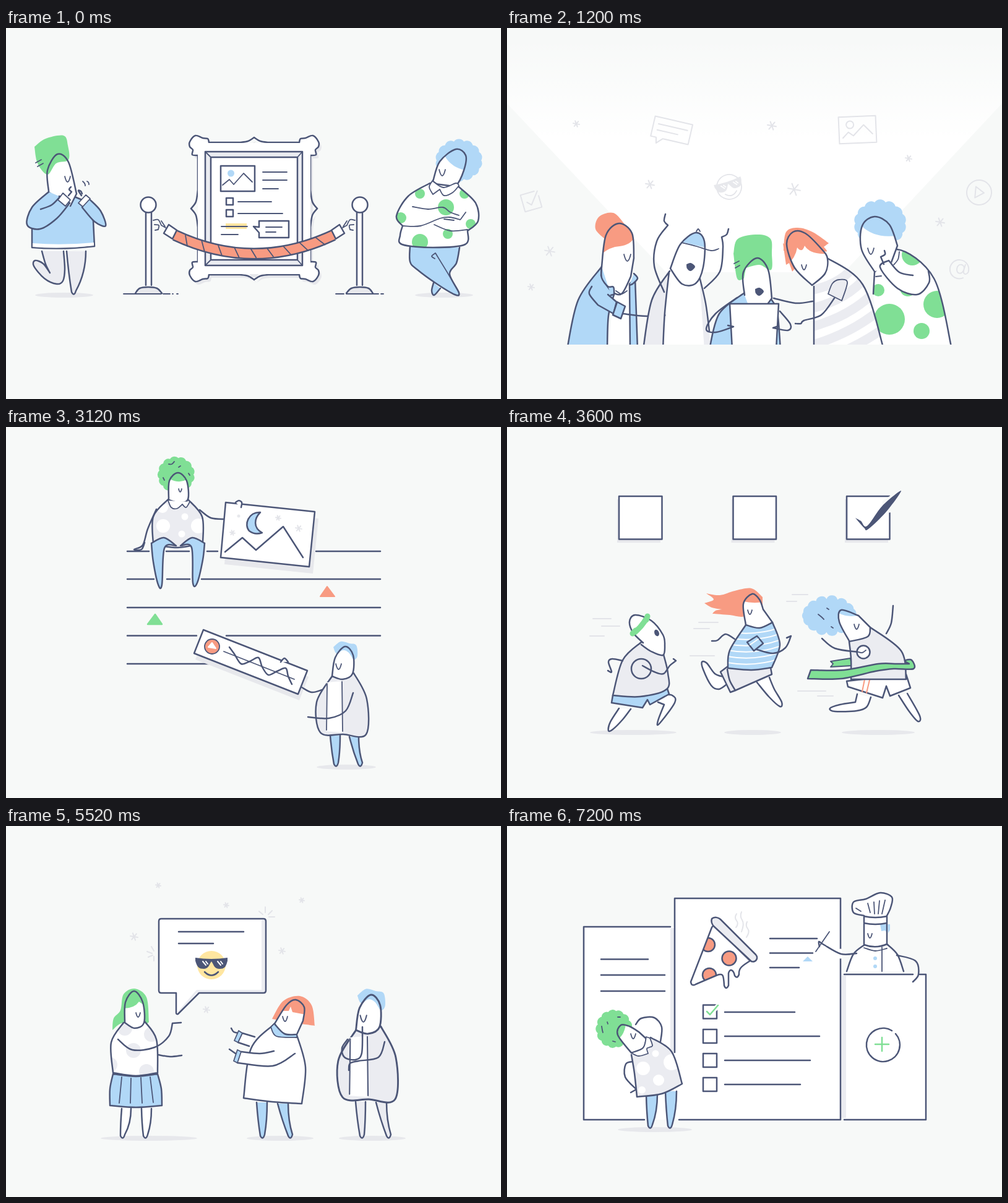
Write an HTML page that moves like this. It is 800 px wide and 600 px high and loops after 8.4 s.

```html
<!DOCTYPE html>
<html lang="en">
<head>
<meta charset="utf-8">
<title>Teamwork</title>
<style>
html,body{margin:0;height:100%;overflow:hidden;background:#f7f9f8}
svg{display:block;width:800px;height:600px;fill:none;stroke:#4c5677;stroke-width:2.5;stroke-linecap:round;stroke-linejoin:round}
.w{fill:#fff}.b{fill:#b1d8f7}.g{fill:#80df95}.r{fill:#f89b82}.e{fill:#ebecf1}.s{fill:#e7e8ec}.y{fill:#ffe6a0}.k{fill:#4c5677}
.n{stroke:none}.t{stroke-width:1.8}.i{stroke:#e3e4e9;stroke-width:2}.iw{stroke:#fff;stroke-width:2}
.gs{stroke:#80df95}.rs{stroke:#f89b82;stroke-width:2}
</style>
</head>
<body>
<svg viewBox="0 0 800 600"></svg>
<script>
let clips = 0;
// Smooth curve through points: "/" makes a corner, "|" starts a new part, "z" closes.
const curve = d => d.split('|').map(part => {
  let last, out = '';
  for (const run of part.split('/')) {
    const v = run.match(/[\d.-]+/g).map(Number), q = last ? [last] : [];
    for (let i = 0; i < v.length; i += 2) q.push([v[i], v[i + 1]]);
    if (!last) out = 'M' + q[0];
    for (let i = 0; i + 1 < q.length; i++) {
      const a = q[i], b = q[i + 1], from = q[i - 1] || a, to = q[i + 2] || b;
      out += 'C' + [0, 1].map(k => a[k] + (b[k] - from[k]) / 6) + ' ' + [0, 1].map(k => b[k] - (to[k] - a[k]) / 6) + ' ' + b;
    }
    last = q.at(-1);
  }
  return out + (part.endsWith('z') ? 'Z' : '');
}).join('');
const data = d => d[0] === 'M' ? d : curve(d);
const p = (d, c = '', more = '') => `<path class="${c}" d="${data(d)}" ${more}/>`;
const o = (x, y, r, c, ry = r) => `<ellipse class="${c}" cx="${x}" cy="${y}" rx="${r}" ry="${ry}"/>`;
const group = (body, transform) => `<g transform="${transform}">${body}</g>`;
const clip = (d, body) => `<clipPath id="c${++clips}">${p(d)}</clipPath><g clip-path="url(#c${clips})">${body}</g>`;
const layered = (d, fill, body) => p(d, fill + ' n') + body + p(d);
const inked = (d, fill, body) => layered(d, fill, clip(d, body));
const shadow = (x, y, r) => o(x, y, r, 's n', 4);
const dots = (c, ...list) => list.map(([x, y, r]) => o(x, y, r, c + ' n')).join('');
const rows = (c, ...list) => p(list.map(([x, y, end]) => `M${x} ${y}H${end}`).join(''), c);
const box = (x, y, w, c = 'w', h = w) => p(`M${x} ${y}h${w}v${h}h${-w}Z`, c);
const eye = (x, y, w = 9) => p(`M${x} ${y}q${w / 2} ${w * 2} ${w} 0`, 't');
const leg = (x1, x2, foot, top, bottom, c) => {
  const mid = (top + bottom) / 2;
  return p(`M${x1} ${top}Q${(x1 + foot) / 2 - 3} ${mid} ${foot - 4} ${bottom - 4}Q${foot} ${bottom + 4} ${foot + 3} ${bottom - 6}Q${x2} ${mid} ${x2} ${top}`, c);
};
const cloud = (x, y, rx, ry, n, c) => {
  const size = (rx + ry) / n * 2;
  const at = k => `${x + rx * Math.cos(k / n * 6.283)} ${y + ry * Math.sin(k / n * 6.283)}`;
  let d = 'M' + at(0);
  for (let k = 1; k <= n; k++) d += `A${size} ${size} 0 0 1 ${at(k)}`;
  return p(d, c + ' n');
};
const stars = (...list) => p(list.map(([x, y, r]) => [10, 70, 130].map(a => {
  const dx = r * Math.cos(a / 57.3), dy = r * Math.sin(a / 57.3);
  return `M${x - dx} ${y - dy}L${x + dx} ${y + dy}`;
}).join('')).join(''), 'i');
const icons = {
  bubble: 'M-31-17H31V16H-11L-20 25-22 16H-31ZM-23-6H25M-23 4H11',
  picture: 'M-30-22H30V21H-30ZM-24 12L-15 3-7 9 10-8 24 7M-6-9A6 6 0 1 1-18-9A6 6 0 1 1-6-9',
  check: 'M9-14H-14V14H14V-5M-7 0L-1 6 14-13',
  play: 'M20 0A20 20 0 1 1-20 0A20 20 0 1 1 20 0M-6-9L8 0-6 9Z',
  at: 'M7 15A16 16 0 1 1 14 4C10 11 5 8 6 1L7-8M6 0C5 11-7 11-6 0C-5-9 6-9 6 0'
};
const icon = (name, x, y, angle, scale = 1) => group(p(icons[name], 'i'), `translate(${x} ${y})rotate(${angle})scale(${scale})`);
const cool = (face, shades, smile) => o(0, 0, 23, face) + p('M-26-12Q0-8 26-12V-7C23 5 20 6 12 6C4 6 3-3 0-6C-3-3-4 6-12 6C-21 6-23 3-26-7Z', shades) +
  p('M-14-6L-9 0M-9-6L-6-2M10-6L15 0M15-6L18-2', 'iw') + p('M-11 11Q0 22 11 11', smile);

function gallery() {
  const corner = '401 177 391 183 378 185/328 185/326 179 318 178 306 174 297 184 297 192 302 197 301 205 310 206/310 262/307 281 299 292';
  const mirror = 'translate(802)scale(-1 1)';
  const frame = c => ['', mirror, 'translate(0 584)scale(1 -1)', 'translate(802 584)scale(-1)'].map(f => group(p(corner, c), f)).join('') + box(310, 186, 182, c + ' n', 212);
  const post = box(226, 300, 9, 'w n', 116) + p('M226 298V416M235 298V416') + p('209 429 216 421 230 419 244 421 252 429', 's') + o(230, 286, 12.5, 'w') +
    p('238 311 246 310 251 319/258 323|240 318 247 319 246 326/241 327|251 312 257 321', 't') + p('M263 318L276 327 269 341 255 332Z', 'w');
  const rope = (c, w) => p('M273 335Q401 395 529 335', '', `style="stroke:${c};stroke-width:${w};stroke-linecap:butt"`);
  let bands = '';
  for (let k = 0; k < 9; k++) {
    const x = 290 + 26.4 * k;
    bands += `M${x} ${357 - 22 * ((x - 401) / 112) ** 2}l${3 + 1.4 * k} ${17.5 - .8 * k}`;
  }
  return group(frame('s n'), 'translate(4 5)') + frame('w') + box(322, 200, 157, 'e', 184) + box(331, 209, 140, 'w', 166) + p('M322 200L331 209M479 200L471 209M322 384L331 375M479 384L471 375', 't') +
    box(347, 223, 55, 'w', 41) + o(363.5, 235, 5.5, 'b n') + p('M350 254L361 245 368 253 384 235 398 249', 't') + box(356, 275, 11) + box(356, 294, 11) + box(355, 316, 34, 'y n', 9) +
    p('M409 312H457V339H409V331L400 321 409 322Z') + rows('t', [415, 233, 454], [415, 246, 454], [415, 260, 440], [375, 281, 429], [375, 300, 447], [348, 321, 390], [348, 334, 375], [420, 322, 446], [420, 330, 436]) +
    rope('#4c5677', 19) + rope('#f89b82', 14) + p(bands, 't') + post + group(post, mirror) +
    rows('t', [190, 430, 251], [254, 430, 265], [269, 430, 270], [276, 430, 278], [533, 430, 546], [550, 430, 602], [606, 430, 610]) +
    shadow(94, 432, 47) + p('58 361 64 382 71 396/60 381 47 376 45 385 62 405 82 414 92 409 95 390 93 361', 'e') + leg(98, 129, 110, 361, 431, 'e') +
    p('M69 265L42 322V355Q90 359 143 353L141 312 123 278 104 270Z', 'b') + p('M43 348Q90 352 142 347V352Q90 358 43 354Z', 'w n') +
    layered('69 264 67 230 83 204 101 217 114 268/104 288', 'w', p('46 192 64 179 93 174 100 190 101 213 81 219 67 237 51 219 46 192', 'g n')) + eye(95, 240) + p('M48 218L57 213M51 224L60 219M124 248Q128 251 128 255M131 248Q134 249 134 253', 't') +
    p('69 265 42 290 34 318 55 325 82 308 103 283/86 272|135 277 153 296 161 320 143 313 123 290', 'b') + p('56 293 74 286 88 272|101 271 106 265/102 261 105 257|122 271 117 263 121 264 123 268') + p('M92 267L104 278 96 288 84 278ZM129 270L136 276 124 289 117 283Z', 'w t') +
    shadow(708, 432, 47) + p('691 412 688 425 692 432 702 421|653 352 653 378 665 391 695 413 725 431 732 428 717 398 728 380 733 355', 'b') + p('732 428 716 400 694 364/688 369 693 373', 't') +
    cloud(732, 214, 36, 31, 14, 'b') + inked('690 248 701 216 727 196 743 206 740 230 727 255 707 258 690 248', 'w', p('M690 190H750V231Q722 229 709 207Z', 'b n')) + eye(700, 229, 10) +
    inked('685 251 650 272 631 304 641 320/637 335 640 350 690 355 742 350 746 328/763 312 759 283 732 257z', 'w', dots('g', [669, 268, 8], [741, 268, 8], [711, 290, 13], [638, 307, 9], [751, 317, 8], [714, 333, 8], [669, 346, 13])) +
    p('641 320 670 320 701 308 717 306 734 310|692 318 718 328 746 326|657 289 682 293 706 290 718 298 732 303|743 298 735 309|708 309 724 311', 't') + p('690 246 684 257 690 269/701 261/708 271 722 266 732 255/727 251 707 258 690 248', 'w t');
}

function crowd() {
  let stripes = '';
  for (let k = 0; k < 6; k++) stripes += `M485 ${425 + k * 30}Q${550 + k * 5} ${415 + k * 26} ${575 + k * 14} ${365 + k * 26}`;
  const mouth = p('290 382 297 380 304 386 297 393 291 389 290 382', 'k n');
  const people =
    p('592 430/594 395/630 358 690 405 719 520/600 520', 'w n') + clip('592 430/594 395/630 358 690 405 719 520/600 520', dots('g', [655, 367, 17], [600, 424, 10], [648, 421, 13], [618, 471, 25], [695, 447, 22], [670, 490, 13])) + p('592 430/594 395/630 358 690 405 719 520') +
    cloud(603, 316, 40, 35, 14, 'b') + inked('594 394 573 358 574 320 594 305 618 318 631 352/620 382', 'w', p('M565 300H635V335Q595 342 573 320Z', 'b n')) + eye(583, 356, 10) + p('634 362 632 374 625 383|596 402 605 401', 't') +
    p('603 387/617 376 634 395 656 400/670 399/681 393 682 412 663 431 631 421 603 387', 'w n') + p('656 400 634 395 617 376/603 387 631 421 663 431 682 412 681 393|609 382 604 370/611 366 610 360') +
    inked('514 370 575 415 609 520/496 520/496 418', 'w', p(stripes, '', 'style="stroke:#ebecf1;stroke-width:15"')) +
    p('447 360 451 330 470 323 494 330 520 348/512 354/517 361 508 361/515 367/490 374z', 'r n') + p('M446 348L451 383 456 380 461 394 468 386 474 372Z', 'r n') +
    inked('493 416 465 388 452 350 462 330 482 332 508 357 518 373 514 397 493 416', 'w', p('M445 320H520V365Q490 367 481 352 477 365 469 355 466 376 445 388Z', 'r n')) + eye(476, 383, 8) +
    p('529 437 508 464 480 473 475 478 466 478|494 442 466 445 431 437') + p('519 430/526 413 537 407 550 411 541 441z', 'e t') +
    p('M174 428L162 520H199V400Z', 'w n') + p('159 342 143 325 149 305 172 299 190 317/180 345z', 'r n') + p('153 386 115 440 97 520/162 520/164 465 174 428/163 418 152 400z|198 414/199 520/211 520/207 405z', 'b') +
    inked('153 386 160 335 181 316 202 332 205 372/200 402/185 430 168 425 154 405', 'w', p('M150 368Q165 354 182 353 203 350 206 336V310H150Z', 'r n')) + eye(189, 366, 11) + p('153 386 153 404 163 418 172 419 173 431/168 432|205 397 211 405 203 414/198 416', 'b') + p('176 425 185 430 194 425', 't') +
    p('137 418 133 430 147 448/172 462/177 443/163 431', 'b') + p('187 462 225 466 265 464|265 459 272 457 279 460') + p('M178 443L191 450 184 470 171 464Z', 'b') +
    p('M262 394L252 520H319L311 402Z', 'w n') + p('M311 402L319 520H331Z', 'e n') + p('263 393 234 440 220 520/252 520/255 460 262 394', 'e') + p('311 402 321 445 327 490') +
    inked('264 389 280 350 305 331 319 345 317 387 305 413 283 414 264 389', 'w', p('M270 343L345 361V325H270Z', 'b n')) + p('282 347 306 353 330 360 342 357|306 329 309 325 312 329', 't') + mouth +
    p('254 427 238 385 242 345 260 319/254 312 256 301|319 421 344 394 349 355 347 338/355 334 358 325') +
    p('384 428 343 462 327 520/442 520/437 460 428 440', 'b') +
    layered('384 432 382 395 404 372 422 391 428 437/420 448/390 448', 'w', p('366 365 373 341 405 334 426 341 428 365 427 391 408 383 386 388/383 405/372 405 366 365', 'g n')) + p('M367 381L375 377M369 388L376 384', 't') + group(mouth, 'translate(111 40)') +
    p('M364 520L360 446H439L435 520', 'w') + p('372 436 337 462 322 487 338 492 366 483/357 481|441 458 458 479 454 489 430 485/439 482');
  return `<linearGradient id="beam" x2="0" y2="1"><stop offset=".04" stop-color="#fff" stop-opacity="0"/><stop offset=".45" stop-color="#fff"/></linearGradient>` + p('M0 0H800V122L545 395H257L0 122Z', 'n', 'style="fill:url(#beam)"') +
    icon('bubble', 266, 166, 13) + icon('picture', 566.5, 165, -2.5) + icon('check', 39, 280, -16) + icon('play', 763, 266, 5) + icon('at', 733, 389, 10, .95) +
    stars([112, 155, 5], [231, 253, 7], [428, 158, 7], [464, 261, 10], [649, 211, 5], [700, 314, 7], [69, 361, 8], [39, 419, 5]) +
    group(cool('i', 's n', 'i'), 'translate(359 257)rotate(-18)scale(.87)') + clip('M0 0H800V512H0Z', people);
}

function suit(neck) {
  return p('-23 48 -48 90 -42 139 -5 142 32 142 33 85 12 43', 'e') + p('M-32 58L-33 137-6 139-7 56Z', 'w n') + p('M-31 60L-32 135M-7 57L-6 137', 't') +
    layered('-23 48 -18 18 -2 0 11 14 10 44' + neck, 'w', p('-21 1 -9 -8 5 -5 16 -2 18 15 12 21 4 10 -5 6 -16 11 -21 1', 'b n')) + eye(-17, 28);
}

function timeline() {
  const photo = 'M355 122L499 137 490 226 347 211Z', strip = 'M319 328L487 394 472 432 304 366Z';
  return rows('', [196, 201, 231], [259, 201, 296], [325, 201, 342], [501, 201, 605], [196, 246, 239], [260, 246, 297], [316, 246, 605], [196, 292, 605], [196, 337.5, 308], [356, 337.5, 605], [196, 383, 333]) +
    p('M241 303L252 319H229Z', 'g gs') + p('M519 258L531 274H508Z', 'r rs') + cloud(275, 77, 28, 27, 13, 'g') +
    inked('262 117 238 145 238 190/278 195 318 188/317 145 294 117', 'e', dots('w', [254, 160, 11], [253, 130, 9], [289, 145, 5.5], [311, 160, 12], [284, 173, 5.5])) +
    inked('263 118 264 87 278 74 292 87 294 117 279 122 263 118', 'w', p('M255 90L264 84Q280 92 292 85L300 90V70H255Z', 'g n')) + p('262 119 267 130 276 132 285 125/291 130 297 121', 'w t') +
    eye(279, 100, 5) + p('263 60 268 60 272 56|279 65 282 63|254 82 256 86|295 75 297 78', 't') + p('243 133 229 165 221 191 207 198 219 198 224 187|313 134 331 147 354 149') +
    p('235 188 255 179 275 192/256 196 252 255 246 255 238 218 235 188|321 188 301 179 282 192/300 195 302 252 309 252 318 215 321 188', 'b') +
    group(p(photo, 's n'), 'translate(6 11)') + p(photo, 'w') + p('M354 202L382 179 404 199 448 161 480 211') + p('M411 138C392 137 384 158 393 168Q402 175 414 171C399 163 401 148 411 138Z', 'b') + stars([366, 171, 4], [440, 147, 4], [473, 164, 5]) + o(376, 144, 2.5, 's n') + p('371 122 376 119 381 122 380 130', 'w') +
    group(p(strip, 's n'), 'translate(2 10)') + p(strip, 'w') + o(333, 355, 12, 'r t') + p('M327 356L333 349 339 358Z', 'w iw') + p('M352 363L466 408', 't') +
    p('361 356 369 367 380 383 394 379 408 373 414 388 424 401 438 395 452 390 456 403 462 416') + p('444 380 450 374 456 380', 'w') +
    shadow(550, 550, 48) + leg(524, 540, 534, 499, 549, 'b') + leg(555, 570, 573, 501, 549, 'b') + p('478 421 494 429 511 425') + group(suit(' -6 53 -23 48'), 'translate(550 355)') + p('561 430 549 459 522 471 488 469');
}

function race() {
  let bands = '';
  for (let y = 330; y < 385; y += 10) bands += `M350 ${y}q50 10 95-7`;
  return [181, 365.5, 549].map(x => box(x - 3, 117, 70, 's n') + box(x, 112, 69.5)).join('') + p('M611 122L634 107M618 118V134', '', 'style="stroke:#f7f9f8;stroke-width:9"') + p('563 147 572 152 582 160 607 127 637 103 613 137 584 165 577 163 563 147', 'k n') +
    rows('i', [139, 310, 168], [153, 322, 182], [134, 338, 157], [310, 316, 341], [302, 326, 327], [296, 370, 335], [461, 271, 486], [452, 282, 468], [470, 427, 515], [502, 435, 527]) + shadow(204, 494, 70) + shadow(397, 494, 46) + shadow(600, 494, 59) +
    p('181 455 167 477 164 491 171 489 187 473 200 456|249 433 267 434 271 446 246 480 244 475 254 449/244 445', 'w') + p('M171 434L169 446 219 454 227 441 231 449 262 432 259 423Z', 'b') +
    p('217 348 187 377 171 434/215 436 258 424 260 398 253 368', 'e') + inked('220 349/204 333 198 315 207 304 233 313 252 336 255 353 252 369 233 363 217 352', 'w', p('M200 337Q218 325 229 303', '', 'style="stroke:#80df95;stroke-width:9"')) + p('M203 334L208 329M225 312L227 306', 'gs', 'style="stroke-width:9"') +
    group(o(0, 0, 3.7, 'k n', 5.5), 'translate(242 333)rotate(-20)') + p('187 378 170 375 164 380 169 396 163 394') + o(217, 391, 16, 'e') + p('219 386 238 396 253 399 263 386 273 378/269 375') +
    p('350 404 336 399 323 382 315 380 317 392 330 418 342 424 354 417|404 413 424 437 441 452 444 445 432 424 424 405', 'w') + p('M357 387L345 396 361 429 369 426 428 400 426 389Z', 'e') + p('356 392 360 410 369 426') + p('368 343 353 335 340 345 331 346') +
    p('322 269 344 272 368 265 395 261 413 275/413 288/385 306 360 304 332 302/337 297 347 295/331 292 319 285/334 279 322 269', 'r n') +
    inked('386 320 360 361 357 390/395 393 428 389/441 352 429 316', 'b', p(bands, 'iw')) + inked('386 320 382 286 396 270 408 279 414 295/429 316/408 325 386 320', 'w', p('M378 260H415V283Q395 286 378 281Z', 'r n')) + eye(389, 296, 7) +
    p('404 360 430 366 450 357 459 338/452 341') + p('M388 348L404 338 414 350 399 362Z', 'b') + p('M393 352L406 343', 'iw') +
    p('566 432 563 445/538 449 522 455 530 460 565 459 581 453 588 437|633 434 650 460 664 476 667 467 647 431', 'w') + p('M549 411L551 420 607 438 613 419 619 435 652 422 645 400Z', 'w') + p('M578 408L574 428M586 409L581 430', 'rs') +
    p('M523 379L555 374 557 386 523 388 527 383Z', 'g t') + cloud(521, 305, 43, 27, 15, 'b') + p('553 347 556 375 556 408/645 408/637 362 587 324', 'e') +
    inked('553 346 537 315 540 296 568 305/587 324/583 339 553 347', 'w', p('M525 285H575L570 304Q552 309 536 301Z', 'b n')) + eye(561, 319, 8) + p('503 303 508 307 512 311|517 293 520 295|524 323 527 325', 't') +
    p('509 342 530 358 567 364|613 334 621 317 624 289') + o(576, 364, 10.5, 'w') + p('565 363 574 365 580 361', 't') +
    p('491 393 545 393 600 383 630 383 650 383/643 378 654 377 657 391 625 391 595 395 540 407 486 407z', 'g');
}

function talk() {
  const bubble = 'M247 154Q247 150 251 150H416Q420 150 420 154V266Q420 270 416 270H312L278 304Q275 305 275 302V270H251Q247 270 247 266Z';
  return stars([246, 96, 4], [356, 128, 4], [478, 120, 4], [446, 202, 5], [207, 179, 6], [324, 297, 5]) + p('M409 138L415 143M419 131V140M430 137L424 143M425 147H434M228 203L236 206M235 195L239 202M230 212L237 209M239 211V218', 'i') +
    inked(bubble, 'w', p('M413 152H420V270H308L278 304V300L308 265H413Z', 'e n')) + rows('', [279, 171, 384], [279, 190, 335]) + group(cool('y n', 'k n', ''), 'translate(332 225)') +
    shadow(231, 505, 78) + shadow(443, 505, 54) + shadow(592, 505, 54) + leg(187, 202, 189, 457, 505, 'w') + leg(219, 235, 226, 457, 505, 'w') +
    p('172 330 174 311 185 298 190 272 208 263 227 277 231 317/222 325/190 318 172 330', 'g n') + inked('190 318 170 350 173 399/210 404 245 399/243 345 224 316', 'w', dots('e', [192, 327, 12], [206, 363, 12], [235, 337, 12], [168, 386, 12], [227, 397, 12])) +
    inked('192 318 193 285 207 267 221 285 223 318 208 327 192 318', 'w', p('M185 295Q207 296 215 284L230 295V260H185Z', 'g n')) + eye(210, 302, 7) +
    p('173 401 168 425 168 452/210 455 252 452/251 425 245 401/210 405 173 401', 'b') + p('M187 406L183 448M202 408L201 448M218 407L220 448M233 406L238 447', 't') + p('181 345 204 362 240 358 263 340 269 319/283 318|246 370 265 373 284 371') +
    leg(405, 422, 415, 447, 505, 'b') + leg(439, 456, 460, 449, 505, 'b') + p('430 312 448 283 475 275 494 290 499 323/470 319z', 'r n') +
    p('434 320 396 360 384 440/430 446 478 449/484 390 470 338', 'w') + p('428 325 437 340 470 342/470 335/434 319z', 'b t') + inked('434 320 453 290 468 281 482 293 480 315/470 337/450 336 434 320', 'w', p('M440 299H457L460 292 463 301 490 306V275H440Z', 'r n')) + eye(447, 308, 8) +
    p('M375 350L393 356 402 341 382 335Z', 'w n') + p('380 365 410 369 432 364/467 367 430 387 374 383z', 'w n') + p('382 335 402 341|375 350 393 356|380 365 410 368 433 364|374 383 431 388 467 368|364 327 368 333 376 335|361 361 371 368') + p('M369 347L376 331 382 335 375 350ZM368 380L374 362 380 365 374 383Z', 'b t') +
    leg(565, 581, 576, 446, 505, 'e') + leg(598, 615, 619, 447, 505, 'e') + group(suit(' -6 53 -23 48'), 'translate(592 273)scale(1.15 1.19)') + p('552 345 543 359 547 374 565 378 575 367 576 325|612 349 602 374 570 380 556 384 554 395');
}

function pages() {
  const sheet = 'M344 104L562 114 551 386 333 378Z', front = 'M541 380L538 457 582 467 594 372Z';
  let bands = '';
  for (let y = 380; y < 455; y += 12) bands += `M538 ${y}q22 8 52 7`;
  return icon('picture', 168, 120, 12, 1.15) + icon('bubble', 644, 119, 13, 1.18) + icon('check', 281, 214, -17, 1.18) + icon('play', 118.5, 261, 8) + icon('at', 684, 295, 10, 1.2) + stars([294, 100, 9], [508, 74, 5], [190, 205, 11], [635, 210, 8]) +
    shadow(230, 528, 60) + shadow(570, 528, 58) + leg(200, 218, 197, 472, 528, 'e') + leg(237, 254, 243, 468, 528, 'e') + inked('182 362 168 405 177 473/275 460/264 390 219 344', 'g', p('M174 467L277 454V463L177 475Z', 'w t')) +
    p('183 360 166 325 172 305 190 305 203 315/219 344/218 358 200 363 183 360', 'w') + p('M182 362Q200 373 219 373L220 355Q211 366 182 362ZM219 344L229 349V357Q222 358 219 353Z', 'w t') + o(186, 326, 7, 'w') + o(199.5, 317, 6, 'w') + p('164 340 167 334 179 330|195 335 200 336 203 330', 't') +
    p('196 398 247 411 298 398|254 370 277 370 295 361') + leg(547, 565, 558, 467, 528, 'e') + leg(583, 600, 604, 472, 528, 'e') +
    p('603 352 624 400 614 472/570 470 531 460/528 425 535 385', 'e') + p(front, 'w n') + clip(front, p(bands, 'rs')) + p('539 405 538 457|594 383 585 420 582 466', 't') +
    p('577 305 583 296 600 295 620 296 623 307 605 312 588 315 577 305', 'b n') + layered('570 325 586 306 608 304 612 323 603 355/565 350', 'w', p('M565 331C580 335 597 324 605 335L603 372 598 378 594 372 590 379 584 373 578 379 573 372 563 378Z', 'b n')) + eye(580, 336, 8) +
    group(p(sheet, 'e'), 'translate(14 16)') + group(p(sheet, 'e'), 'translate(7 8)') + p(sheet, 'w') + dots('k', [397, 233, 3.5], [396, 256, 3.5], [395, 280, 3.5]) +
    p('M387 150L519 156M386 176L518 181M385 201L453 204M414 234L489 237M413 256L497 260M412 280L473 283M380 312L512 317M379 336L474 340') +
    p('504 402 483 408 465 395 457 375/460 378|605 390 585 413 545 415 522 402 507 378/512 384');
}

function recipe() {
  const slice = 'M331 164L297 252Q298 260 305 256L340 241C349 238 350 240 351 258Q354 266 358 258V238C360 230 366 232 368 242Q372 248 375 240C374 230 380 226 393 218L334 160Z';
  return box(124, 163, 147, 'w n', 312) + box(264, 165, 6, 'e n', 308) + p('M264 163H124V475H222') + box(271, 117, 268, 'w n', 358) + p('M271 366V117H539V475H278') + box(545, 240, 132, 'w n', 235) + box(541, 242, 7, 'e n', 230) + p('M545 240H656M667 240H677V475H545') +
    rows('', [152, 215.5, 228], [152, 241, 255], [152, 267, 255], [425, 182, 501], [425, 205.5, 494], [425, 229, 472], [352, 301, 465], [352, 340, 505], [352, 379, 490], [352, 418, 474]) +
    [289.5, 329, 368, 407].map(y => box(317, y, 22)).join('') + p('M334 298L341 291', 'iw', 'style="stroke-width:8"') + p('M323 300L328 305 341 290M595 353H617M606 342V364', 'gs') + p('M486 211L494 219H478Z', 'b n') + p('M628 336A27 27 0 1 1 622 331') +
    p('M371 142q-4 6 0 11t-1 11M379 139q-3 7 1 13t-1 19M388 155q-3 6 1 11t-2 14', 'i') + inked(slice, 'w', o(359, 214, 11.5, 'r') + o(325, 192, 11, 'r') + o(327, 241, 11, 'r')) + p('M331 150C335 146 342 148 345 151L402 208C407 214 402 221 395 219L334 162Q329 156 331 150Z', 'e') +
    shadow(239, 491, 60) + leg(225, 243, 232, 434, 489, 'b') + leg(256, 274, 264, 429, 489, 'b') + cloud(173, 328, 27, 29, 13, 'g') + p('208 321 217 311 238 310 250 325 248 349|204 381 192 385 191 406 209 426/200 431') +
    inked('201 370 206 400 210 438/250 433 283 417/266 365 232 342', 'e', dots('w', [220, 392, 11], [240, 368, 5.5], [266, 382, 13], [245, 411, 9], [218, 427, 6])) +
    inked('201 367 179 338 184 322 198 324 213 333/225 344/220 359 201 367', 'w', p('M170 315H193Q190 340 178 345Z', 'g n')) + eye(200, 336, 8) + p('153 324 154 330 155 334|162 317 163 320|179 309 183 309|171 348 175 349', 't') +
    p('201 367 213 372 228 368/226 360 230 358 235 355 231 343/225 341/220 359 201 367', 'w t') +
    p('M578 192C562 200 553 218 549 235H641C637 215 628 202 614 191Z', 'w n') + p('549 235 560 207 578 192|614 191 631 208 641 235') + inked('M577 158V192Q596 199 614 191V158', 'w', p('M603 159H619V168L616 174 611 169 605 170Z', 'b n')) + p('M615 159H619V168L616 173Z', 'b n') +
    eye(583, 174, 7) + p('577 197 595 202 614 198|606 196 606 235', 't') + p('577 145 560 140 560 123 580 118 603 108 622 115 620 132 613 147', 'w') + p('M577 146Q595 150 614 146V157Q595 161 577 157Z', 'w') + p('564 133 572 138|583 125 587 140|593 123 594 142|602 121 600 142|611 120 606 142', 't') + dots('b', [595, 214, 3], [595, 227, 3]) +
    p('M539 201V212', 'iw', 'style="stroke-width:5"') + p('565 206 540 207 512 192 504 187 505 195|630 209 660 218 665 240 656 252') + p('M521 171L499 203', 't');
}

const svg = document.querySelector('svg');
svg.innerHTML = [gallery, crowd, timeline, race, talk, pages, recipe].map(draw => `<g>${draw()}</g>`).join('');
const scenes = [...svg.children];
function tick(now) {
  const current = Math.floor(now / 1200) % scenes.length;
  scenes.forEach((scene, k) => scene.style.display = k === current ? '' : 'none');
  requestAnimationFrame(tick);
}
tick(performance.now());
</script>
</body>
</html>
```
